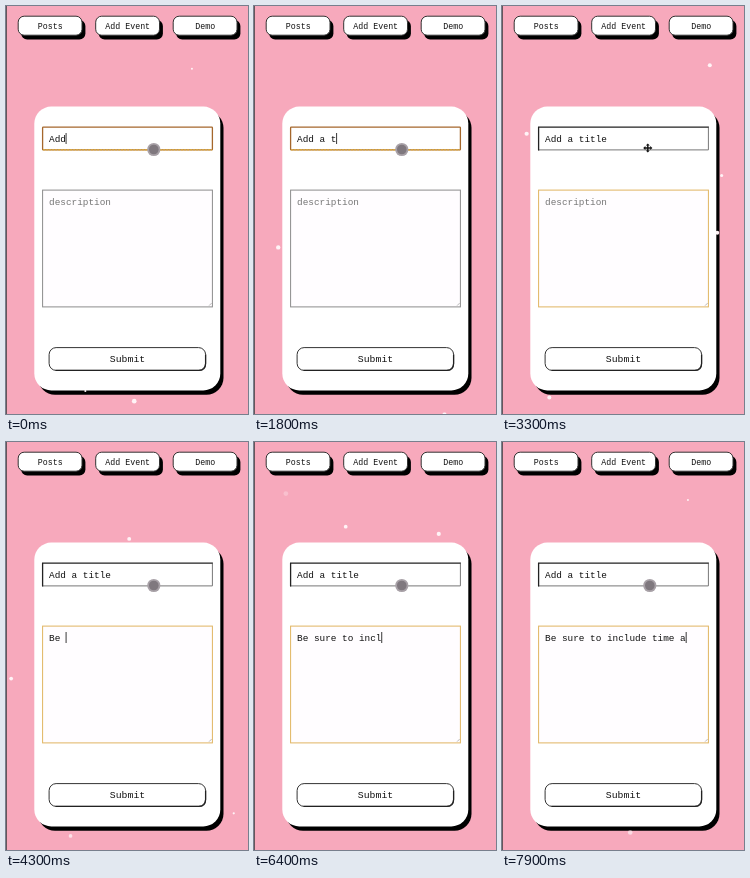
Animation of 242 by 408 pixels, one loop 8000 ms. Source, as an HTML page:

```html
<!DOCTYPE html>
<html lang="en">
<head>
<meta charset="utf-8">
<style>
html, body { margin: 0; width: 100%; height: 100%; overflow: hidden; background: #f7a9bc; }
svg { display: block; width: 242px; height: 408px; }
text { font: 9.4px "Liberation Mono", monospace; white-space: pre; fill: #111; }
.nav text { font-size: 8.3px; }
.mid { text-anchor: middle; }
.hint { fill: #757575; }
</style>
</head>
<body>
<svg viewBox="0 0 242 408">
  <rect width="242" height="408" fill="#f7a9bc"/>
  <rect width="1" height="408" fill="#66565b"/>
  <rect x="32" y="105" width="185.5" height="283.7" rx="17"/>
  <g id="snow" fill="#fff3f6"></g>
  <g id="nav" class="nav mid"></g>
  <rect x="28.3" y="100.6" width="186" height="283.8" rx="17" fill="#fff"/>

  <g transform="translate(-.4 -.4)" fill="none">
    <g id="idle">
      <path d="M206.8 121V144.3H36.5" stroke="#777"/>
      <path d="M37 144.8V121.5H207" stroke="#222" stroke-width="1.3"/>
    </g>
    <g id="active">
      <rect x="37" y="121.5" width="169.8" height="22.8" rx=".7" stroke="#a5672c" stroke-width="1.3"/>
      <path d="M37.5 144.3H206.5" stroke="#e8b82e" stroke-dasharray="2 1"/>
    </g>
    <rect id="area" x="37" y="184.5" width="169.8" height="116.8" fill="#fffdff"/>
    <path d="M203.5 300L206 297.5" stroke="#999" stroke-width=".7"/>
    <rect x="43.5" y="342" width="156.5" height="22.8" rx="7" stroke="#333"/>
    <path d="M50 364.8H193Q200 364.8 200 357.8V349" stroke="#222" stroke-width="1.3"/>
  </g>
  <text id="title" x="43" y="135.6"></text>
  <text id="body" x="43" y="198.7"></text>
  <rect id="caret" width=".9" height="11" fill="#222"/>
  <text class="mid" x="121.5" y="356" style="font-size:9.8px">Submit</text>

  <g id="touch">
    <circle cx="147.8" cy="143.5" r="6.6" fill="#a8a1a7"/>
    <circle cx="147.8" cy="143.5" r="4.8" fill="#7f787e"/>
  </g>
  <g id="move" transform="translate(145.8 142)">
    <path d="M-3 0H3M0 -3V3" stroke="#111" stroke-width="1.4"/>
    <path d="M-4.6 0l2.2-2v4zM4.6 0l-2.2-2v4zM0-4.6l-2 2.2h4zM0 4.6l-2-2.2h4z" fill="#111"/>
  </g>
</svg>
<script>
const LOOP = 8000, CHAR = 5.64, LIFE = 640;
const TITLE = 'Add a title', BODY = 'Be sure to include time a';
const $ = id => document.getElementById(id);
const show = (id, on) => $(id).setAttribute('visibility', on ? 'visible' : 'hidden');
const set = (el, attrs) => { for (const k in attrs) el.setAttribute(k, attrs[k]); };

$('nav').innerHTML = ['Posts', 'Add Event', 'Demo'].map((label, i) => {
  const x = 12.2 + 77.5 * i;
  return `<rect x="${x + 3}" y="14" width="64.2" height="19.5" rx="6"/>
    <rect x="${x}" y="10.2" width="63.8" height="19" rx="6" fill="#fff" stroke="#333"/>
    <text x="${x + 32}" y="22.6">${label}</text>`;
}).join('');

// Snow flakes: each appears at a random spot, sinks a little and fades
let seed = 11;
const rnd = () => (seed = seed * 16807 % 2147483647) / 2147483647;
const flakes = Array.from({ length: 80 }, () => ({
  dot: $('snow').appendChild(document.createElementNS('http://www.w3.org/2000/svg', 'circle')),
  born: LOOP * rnd(), x: 5 + 232 * rnd(), y: 36 + 370 * rnd(), r: 1 + 1.5 * rnd()
}));

function drawSnow(t) {
  for (const { dot, born, x, y, r } of flakes) {
    const age = (t - born + LOOP) % LOOP / LIFE;
    const opacity = age < 1 ? Math.min(1, 4 * Math.sin(Math.PI * age)) : 0;
    set(dot, { cx: x, cy: y + 30 * age, r, opacity });
  }
}

function draw(t) {
  drawSnow(t);
  const inBody = t >= 2700;
  const title = TITLE.slice(0, 3 + 8 * (t / 2500) ** 1.5);
  const body = BODY.slice(0, Math.max(0, (t - 3795) / 163.5));
  $('title').textContent = title;
  $('body').textContent = body || 'description';
  $('body').classList.toggle('hint', !body);
  set($('area'), { stroke: inBody ? '#e0b561' : '#8c8c8c' });
  show('active', !inBody);
  show('idle', inBody);

  const count = (inBody ? body : title).length;
  set($('caret'), { x: 42.7 + count * CHAR, y: inBody ? 190 : 127 });
  show('caret', t < 3230 || t >= 3760);

  const crossed = t >= 2800 && t < 3700;
  show('move', crossed);
  show('touch', !crossed);
}

const start = performance.now();
function tick() {
  draw((performance.now() - start) % LOOP);
  requestAnimationFrame(tick);
}
tick();
</script>
</body>
</html>
```
